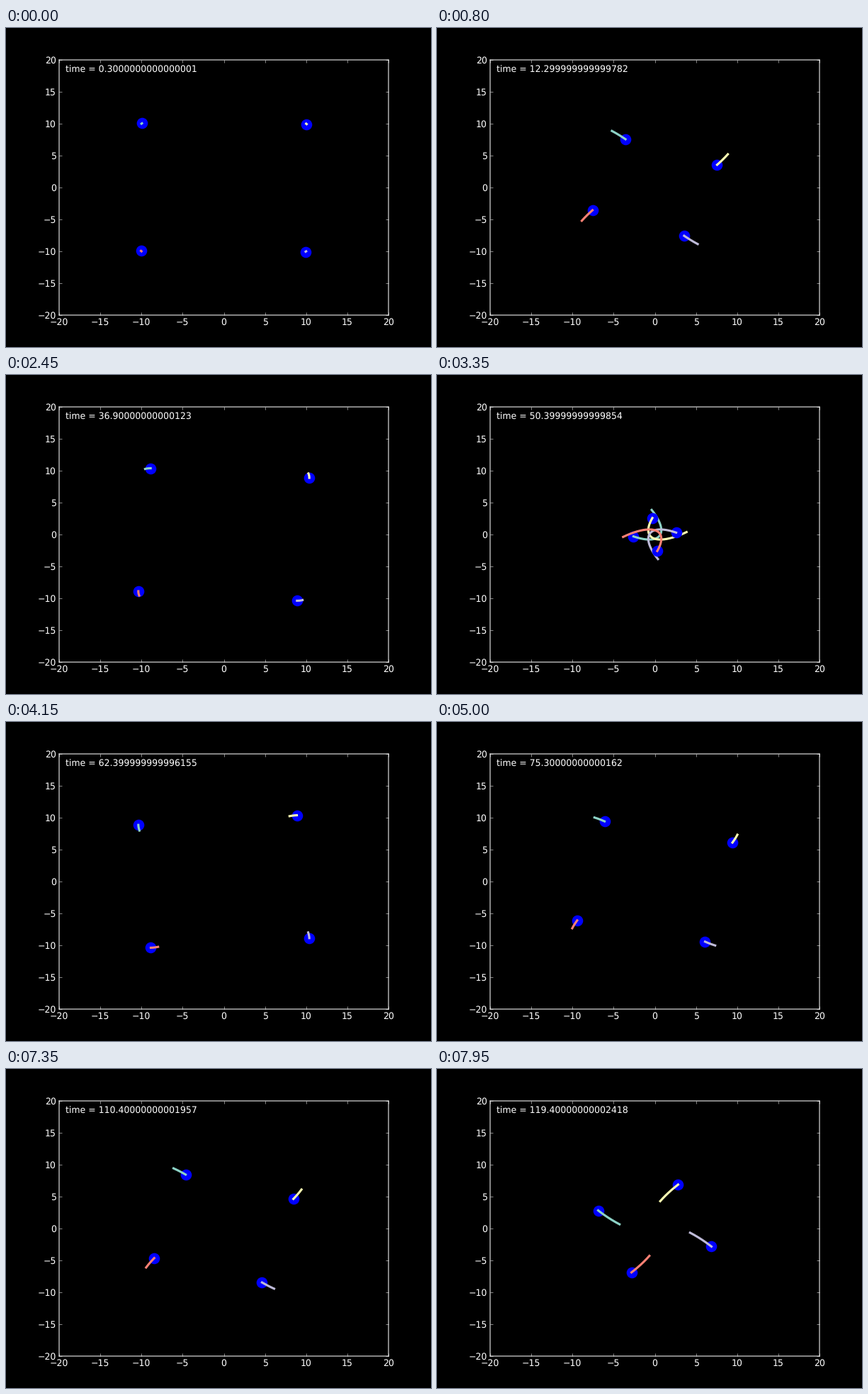
Recreate the animation shown at these times as a matplotlib script. Size 600 by 450 pixels, loop 8 s.

```python
import numpy as np
import matplotlib.pyplot as plt
from itertools import accumulate, repeat
from matplotlib.animation import FuncAnimation

plt.rcParams.update({
    "font.family": "DejaVu Sans",
    "font.size": 12,
    "text.hinting": "no_hinting",
    "figure.facecolor": "black",
    "axes.facecolor": "black",
    "axes.edgecolor": "white",
    "axes.linewidth": 1.0,
    "text.color": "white",
})

FRAMES, INTERVAL = 160, 50
DT = 0.01            # physics step
STEPS = 30           # physics steps per picture
TRAIL = 200          # points kept in each trail
MASS, START, SPEED = 15.0, 10.0, 0.2
COLORS = ["#8dd3c7", "#feffb3", "#bfbbd9", "#fa8174"]
TURNS = [1, 0, 3, 2]  # quarter turns from the top right body


def orbit(t):
    """Top right body of four equal masses in a square: a Kepler ellipse."""
    mu = MASS * (0.25 + np.sqrt(0.5))
    apo = START * np.sqrt(2)
    a = 1 / (2 / apo - 2 * SPEED**2 / mu)
    e = apo / a - 1
    mean = (np.pi + t * np.sqrt(mu / a**3)) % (2 * np.pi)
    ecc = mean + 0.85 * e * np.sign(np.sin(mean))
    for _ in range(12):
        ecc -= (ecc - e * np.sin(ecc) - mean) / (1 - e * np.cos(ecc))
    along = a * (np.cos(ecc) - e)
    across = a * np.sqrt(1 - e * e) * np.sin(ecc)
    # periapsis points to the lower left, motion is clockwise
    return (along * (-1 - 1j) + across * (-1 + 1j)) / np.sqrt(2)


total = STEPS * (int(2.5 * FRAMES) + 1)
path = orbit(DT * np.arange(total + 1))
clock = list(accumulate(repeat(DT, total), initial=0.0))

fig = plt.figure(figsize=(8, 6), dpi=75)
ax = fig.add_axes([0.125, 0.1, 0.775, 0.8])
ax.set(xlim=(-20, 20), ylim=(-20, 20),
       xticks=range(-20, 21, 5), yticks=range(-20, 21, 5))
ax.tick_params(direction="in", length=4, width=0.5, pad=4, colors="white",
               top=True, right=True)
for spine in ax.spines.values():
    spine.set_snap(False)

# each body lies over the trails of the bodies before it
dots, trails = [], []
for i, color in enumerate(COLORS):
    dots.append(ax.scatter([0], [0], s=15**2, color="blue", linewidths=0,
                           zorder=2 + 0.1 * i))
    trails += ax.plot([], [], color=color, lw=3, zorder=2.05 + 0.1 * i)
label = ax.text(0.02, 0.95, "", transform=ax.transAxes)


def draw(k):
    now = STEPS * (int(2.5 * k) + 1)
    part = path[max(0, now - TRAIL + 1):now + 1]
    for dot, trail, turn in zip(dots, trails, TURNS):
        z = part * 1j**turn
        trail.set_data(z.real, z.imag)
        dot.set_offsets([[z[-1].real, z[-1].imag]])
    label.set_text(f"time = {clock[now]}")
    return [*dots, *trails, label]


anim = FuncAnimation(fig, draw, frames=FRAMES, interval=INTERVAL,
                     repeat=True, repeat_delay=0, blit=False)
plt.show()
```
